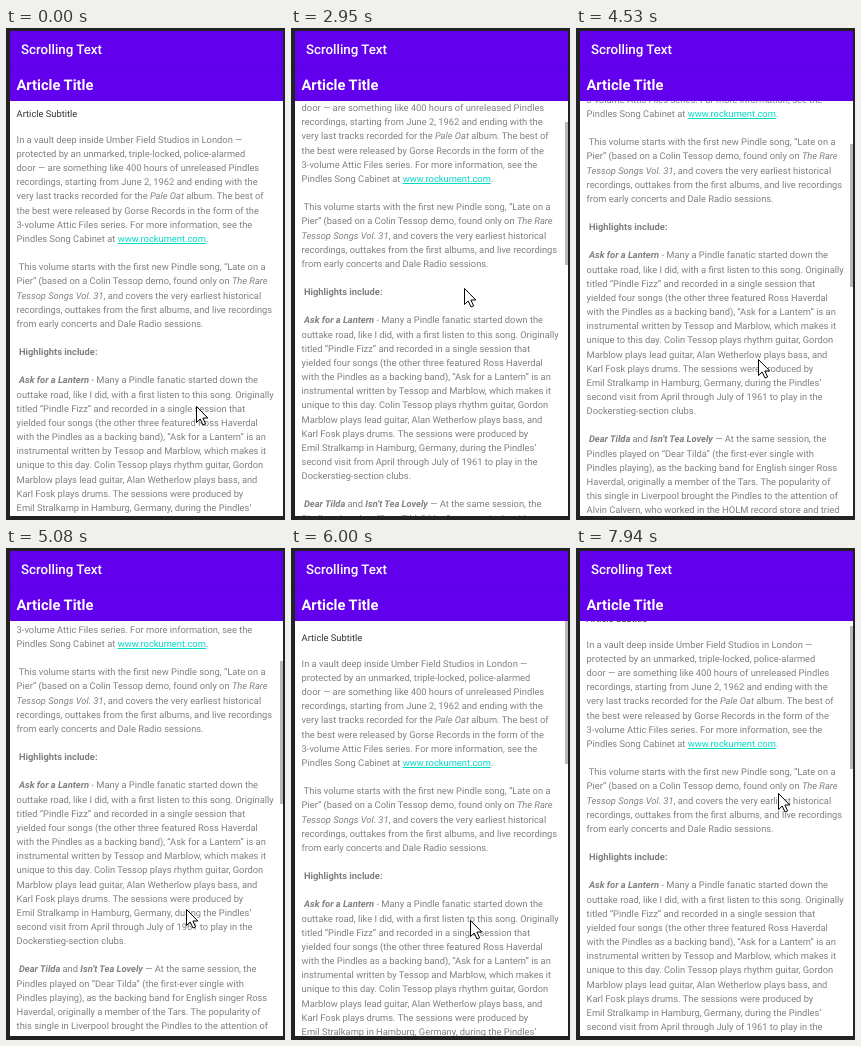
Animation of 279x492 px, one loop 8000 ms. Source, as an HTML page:

```html
<!DOCTYPE html>
<html lang="en">
<head>
<meta charset="utf-8">
<title>Scrolling Text</title>
<style>
  html, body { margin: 0; width: 100%; height: 100%; overflow: hidden; background: #222; }
  #stage { position: relative; width: 279px; height: 492px; overflow: hidden;
    font-family: Roboto, sans-serif; text-rendering: geometricPrecision; }
  #stage > * { position: absolute; }
  .bar { left: 4px; width: 273px; height: 35px; background: #6200ee; color: #fff; white-space: pre; }
  #appbar { top: 3px; font: 500 13.33px/40px Roboto, sans-serif; text-indent: 11px; }
  #title { top: 38px; font: 700 14.67px/38px Roboto, sans-serif; text-indent: 6.5px;
    box-shadow: inset 0 1px #5a00dc; }
  #view { left: 4px; top: 73px; width: 273px; height: 415px; background: #fff; overflow: hidden; }
  #content { position: absolute; left: 6.6px; top: 0; white-space: pre; font-size: 9.33px; color: #808080; }
  #subtitle { position: absolute; top: 7px; line-height: 14px; color: #333; }
  #article { position: absolute; top: 32.8px; line-height: 14.15px; }
  #article u { color: #03dac5; }
  #thumb { position: absolute; left: 270px; top: 0; width: 3px; height: 143px; background: #b8b8b8; }
  #cursor { left: 0; top: 0; overflow: visible; }
</style>
</head>
<body>
<div id="stage">
  <div id="view">
    <div id="content">
      <div id="subtitle">Article Subtitle</div>
      <div id="article">In a vault deep inside Umber Field Studios in London —
protected by an unmarked, triple-locked, police-alarmed
door — are something like 400 hours of unreleased Pindles
recordings, starting from June 2, 1962 and ending with the
very last tracks recorded for the <i>Pale Oat</i> album. The best of
the best were released by Gorse Records in the form of the
3-volume Attic Files series. For more information, see the
Pindles Song Cabinet at <u>www.rockument.com</u>.

 This volume starts with the first new Pindle song, “Late on a
Pier” (based on a Colin Tessop demo, found only on <i>The Rare
Tessop Songs Vol. 31</i>, and covers the very earliest historical
recordings, outtakes from the first albums, and live recordings
from early concerts and Dale Radio sessions.

 <b>Highlights include:</b>

 <b><i>Ask for a Lantern</i></b> - Many a Pindle fanatic started down the
outtake road, like I did, with a first listen to this song. Originally
titled “Pindle Fizz” and recorded in a single session that
yielded four songs (the other three featured Ross Haverdal
with the Pindles as a backing band), “Ask for a Lantern” is an
instrumental written by Tessop and Marblow, which makes it
unique to this day. Colin Tessop plays rhythm guitar, Gordon
Marblow plays lead guitar, Alan Wetherlow plays bass, and
Karl Fosk plays drums. The sessions were produced by
Emil Stralkamp in Hamburg, Germany, during the Pindles’
second visit from April through July of 1961 to play in the
Dockerstieg-section clubs.

 <b><i>Dear Tilda</i></b> and <b><i>Isn’t Tea Lovely</i></b> — At the same session, the
Pindles played on “Dear Tilda” (the first-ever single with
Pindles playing), as the backing band for English singer Ross
Haverdal, originally a member of the Tars. The popularity of
this single in Liverpool brought the Pindles to the attention of
Alvin Calvern, who worked in the HOLM record store and tried</div>
    </div>
    <div id="thumb"></div>
  </div>
  <div id="appbar" class="bar">Scrolling Text</div>
  <div id="title" class="bar">Article Title</div>
  <svg id="cursor" width="13" height="20">
    <path d="M.5 .5V16.5L4.2 13L7 19L9.6 17.9L6.9 12H11.8Z" fill="#fff" stroke="#000"/>
  </svg>
</div>
<script>
const LOOP = 8000, TICK = 132.3;
const THUMB_RATIO = 143 / 415;

// Glides: start tick, end tick, where to. Values rest between glides.
const pointerGlides = [
  [1, 3, 172, 302], [3, 5, 65, 192], [6, 8, 82, 113], [8, 9, 144, 130],
  [9, 11, 82, 189], [11, 12, 153, 168], [12, 14, 186, 262], [14, 16, 186, 265],
  [16, 18, 171, 242], [18, 21, 173, 260], [22, 25, 178, 338], [25, 30, 180, 276],
  [32, 34, 182, 331], [34, 38, 180, 361], [38, 45, 179, 372], [45, 47, 179, 390],
  [47, 52, 260, 188], [52, 54, 202, 245]
];
const scrollGlides = [
  [14, 16, 15], [18, 21, 60], [25, 30, 130], [32, 34, 125],
  [34, 38, 115], [38, 45, -4], [45, 46, 0], [59, 60, 15]
];

const el = id => document.getElementById(id);
const clamp = v => Math.min(1, Math.max(0, v));

function glide(glides, from, tick) {
  return glides.reduce((value, [start, end, ...to]) => {
    const p = clamp((tick - start) / (end - start));
    return value.map((v, i) => v + (to[i] - v) * p);
  }, from).map(Math.round);
}

// The scroll thumb stays for two ticks after a scroll, then fades over two.
function thumbAlpha(tick) {
  const last = scrollGlides.findLast(([start]) => start < tick);
  return last ? clamp(2 - (tick - last[1]) / 2) : 0;
}

const content = el('content'), thumb = el('thumb'), cursor = el('cursor');
const begin = performance.now();

function draw() {
  const tick = Math.floor(Math.max(0, performance.now() - begin) % LOOP / TICK);
  const [x, y] = glide(pointerGlides, [190, 378], tick);
  const [offset] = glide(scrollGlides, [0], tick);
  cursor.style.transform = `translate(${x}px, ${y}px)`;
  content.style.transform = `translateY(${-offset}px)`;
  thumb.style.transform = `translateY(${Math.round(Math.max(0, offset) * THUMB_RATIO)}px)`;
  thumb.style.opacity = thumbAlpha(tick);
  requestAnimationFrame(draw);
}
draw();
</script>
</body>
</html>
```
